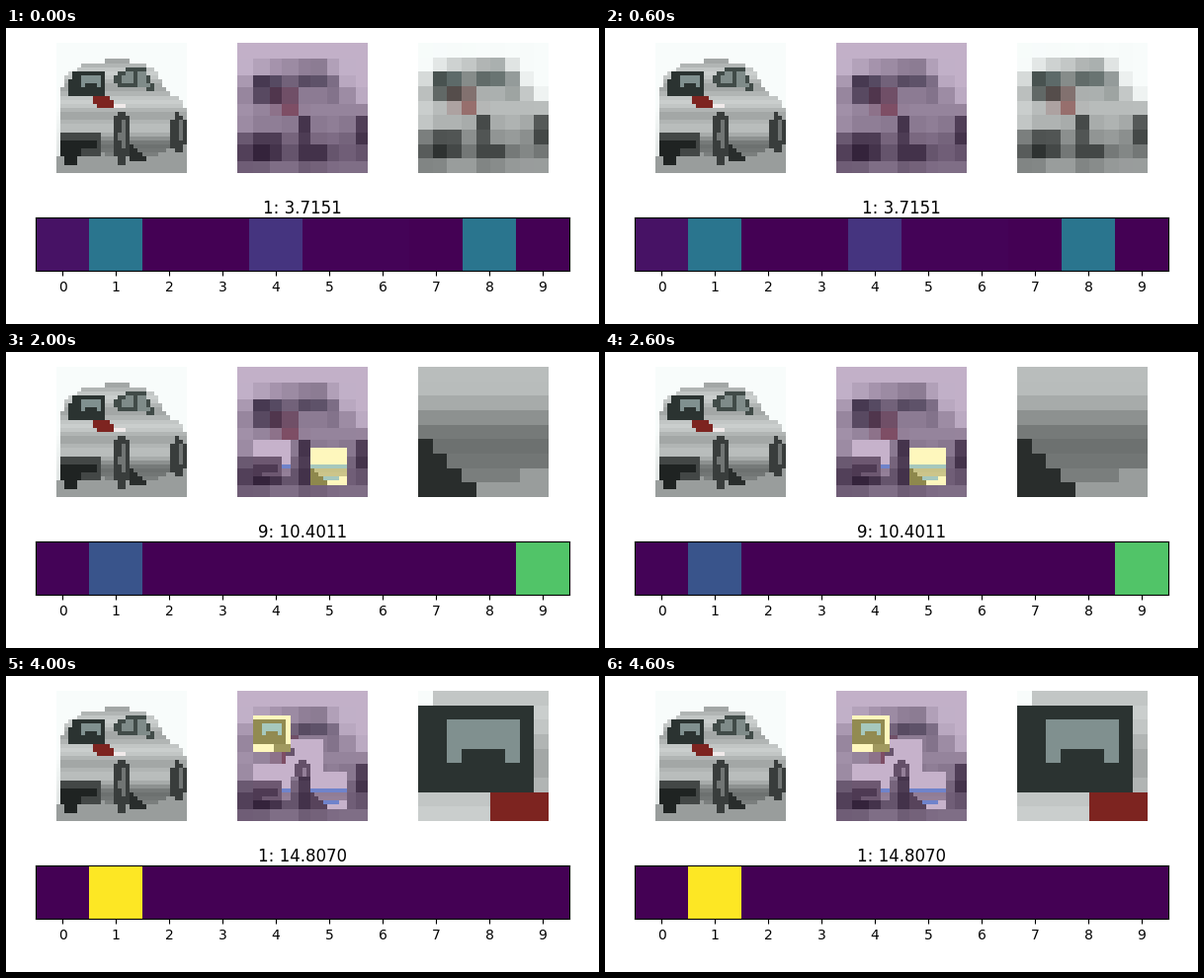
Recreate the animation shown at these times as a matplotlib script. Size 600x300 px, loop 5000 ms.

```python
import numpy as np
import matplotlib.pyplot as plt
from matplotlib.animation import FuncAnimation
from matplotlib.colors import to_rgb
from matplotlib.path import Path

N, G = 32, 9  # photo side and glimpse side, in cells
ROWS, COLS = np.mgrid[:N, :N] + 0.5
CENTERS = np.c_[COLS.ravel(), ROWS.ravel()]

# (title, {class: probability}, top-left cell of the glimpse)
STEPS = [
    ("1: 3.7151", {0: .05, 1: .39, 4: .15, 5: .01, 6: .01, 8: .39}, None),
    ("9: 8.5688", {0: .01, 1: .01, 9: .98}, (4, 18)),
    ("9: 10.4011", {0: .01, 1: .26, 9: .73}, (18, 20)),
    ("1: 22.7098", {1: 1}, (12, 12)),
    ("1: 14.8070", {1: 1}, (4, 6)),
]


def grey(v):
    """Slightly cool grey from a level or an array of levels."""
    return np.stack([v - 3, v + 1, v], axis=-1) / 255


def inside(*pts):
    return Path(pts).contains_points(CENTERS).reshape(N, N)


def oval(cx, cy, rx, ry):
    return ((COLS - cx) / rx) ** 2 + ((ROWS - cy) / ry) ** 2 < 1


def draw_body(img):
    # soft bands of reflected light, darker toward the road
    bands = 185 + 20 * np.cos((ROWS - 21.5) * 2 * np.pi / 7)
    shade = grey(bands - 9 * np.clip(ROWS - 19.5, 0, 8))
    body = inside((.6, 14), (2.4, 8), (6, 5.6), (13, 4.2), (20, 4.6), (24, 6.6),
                  (27, 12), (31, 14.3), (32.2, 18), (32, 24), (24, 28), (.8, 27))
    img[body] = shade[body]


def draw_windows(img):
    img[inside((2.6, 12.8), (4, 7), (11.9, 6.6), (12, 13), (5, 13))] = to_rgb("#2b3331")
    img[inside((14, 9), (15, 6.8), (21.5, 5.9), (24, 11.6), (15, 11.2))] = to_rgb("#414b48")
    img[inside((6, 11), (6, 8), (11, 8), (11, 10.8), (9, 9.6))] = to_rgb("#80908f")
    img[inside((15.8, 10.3), (16, 7.6), (21.4, 7), (22.8, 10.8))] = to_rgb("#7f8b89")
    img[(COLS // 1 == 19) & (ROWS > 6) & (ROWS < 11)] = to_rgb("#414b48")


def draw_rear(img):
    img[inside((9, 13), (13.2, 13), (14, 16), (10, 16))] = to_rgb("#7d2420")
    img[inside((14, 15), (17, 15), (17, 16), (14, 16))] = to_rgb("#f0eaea")
    img[inside((.8, 22), (11, 22), (11, 28), (.8, 27))] = grey(70)
    img[inside((1, 24), (10.4, 24), (10.4, 26), (5.6, 26), (5.4, 30), (1.8, 30))] = grey(34)


def draw_wheels(img):
    img[inside((18, 25), (23, 29), (18, 29.5))] = grey(44)
    for cx, cy, rx, ry in ((16, 23.4, 2.4, 6.5), (29.9, 22.2, 2, 4.8)):
        img[oval(cx, cy, rx, ry)] = grey(60)
        img[oval(cx + .4, cy - .6, rx * .4, ry * .55)] = grey(116)


def make_photo():
    img = grey(251 - 2 * np.clip(ROWS - 16, 0, 10))
    road = inside((0, 28), (32, 24), (32, 33), (0, 33))
    img[road] = grey(156)
    for draw in (draw_body, draw_windows, draw_rear, draw_wheels):
        draw(img)
    return np.clip(img, 0, 1)


def shrink(img):
    """Area average from N x N down to G x G."""
    edges = np.arange(G + 1) * N / G
    px = np.arange(N)
    wt = np.minimum(px + 1, edges[1:, None]) - np.maximum(px, edges[:-1, None])
    wt = np.clip(wt, 0, None) * G / N
    return np.einsum("ai,bj,ijc->abc", wt, wt, img)


def expose(patch):
    """Lift the shadows, tint the midtones blue and burn out the lights."""
    light = patch.mean(axis=2, keepdims=True)
    out = np.where(light > .46, to_rgb("#82bbff"), light * 1.2 + .17)
    return np.where(light > .56, 1, out)


def window(spot):
    x, y = spot
    return slice(y, y + G), slice(x, x + G)


PHOTO = make_photo()
COARSE = shrink(PHOTO)
BLOCK = np.arange(N) * G // N


def canvas(i):
    img = COARSE[BLOCK][:, BLOCK]
    heat = np.zeros((N, N))
    spots = [spot for *_, spot in STEPS[1:i + 1]]
    for spot in spots:
        img[window(spot)] = expose(PHOTO[window(spot)])
    if spots:
        heat[window(spots[-1])] = 1
    return .7 * img + .3 * plt.cm.viridis(heat)[..., :3]


def glimpse(i):
    spot = STEPS[i][2]
    return PHOTO[window(spot)] if spot else COARSE


def scores(i):
    return [[STEPS[i][1].get(k, 0) for k in range(10)]]


fig = plt.figure(figsize=(6, 3), dpi=100, facecolor="white")
grid = fig.add_gridspec(2, 3, left=.05, right=.95, bottom=.05, top=.95,
                        wspace=.05, hspace=.05)


def picture(col, img):
    ax = fig.add_subplot(grid[0, col])
    ax.axis("off")
    return ax.imshow(img, interpolation="nearest")


picture(0, PHOTO)
seen = picture(1, canvas(0))
zoom = picture(2, glimpse(0))

bar_ax = fig.add_subplot(grid[1, :])
bar = bar_ax.imshow(scores(0), vmin=0, vmax=1, cmap="viridis", interpolation="nearest")
bar_ax.set_xticks(range(10))
bar_ax.set_yticks([])
title = bar_ax.set_title("", fontsize=12, pad=1.5)


def update(i):
    seen.set_data(canvas(i))
    zoom.set_data(glimpse(i))
    bar.set_data(scores(i))
    title.set_text(STEPS[i][0])
    return seen, zoom, bar, title


anim = FuncAnimation(fig, update, frames=len(STEPS), interval=1000,
                     repeat=True, repeat_delay=0)
plt.show()
```
